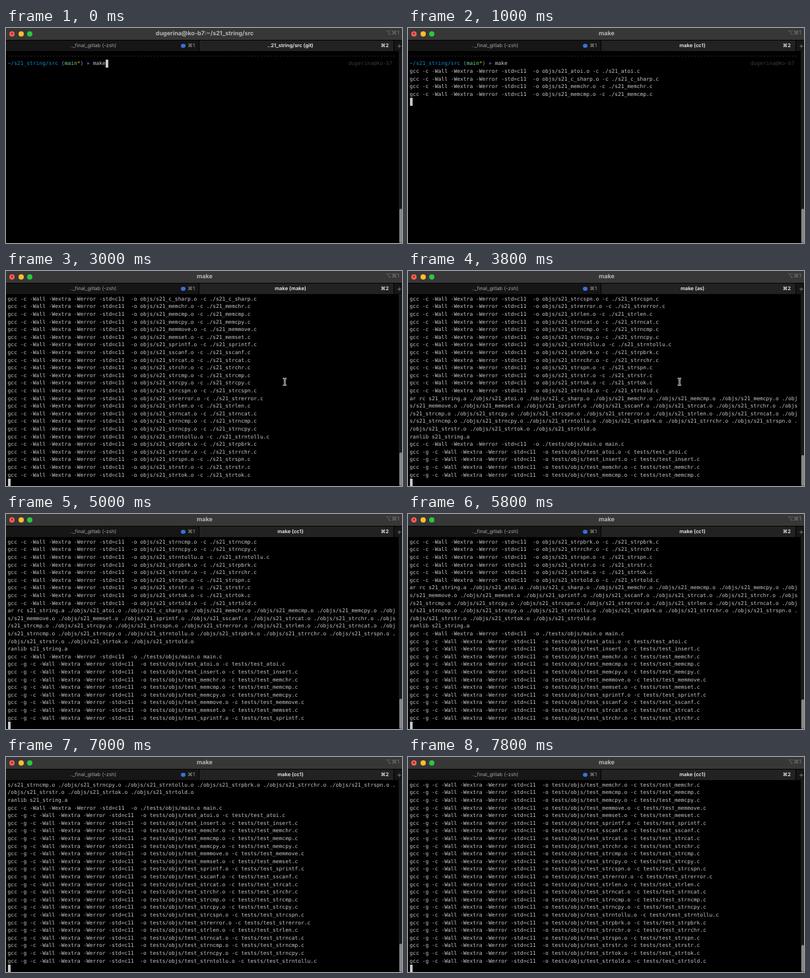
Write an HTML page that moves like this. It is 600 by 326 pixels and loops after 8 s.

```html
<!DOCTYPE html>
<html lang="en">
<head>
<meta charset="utf-8">
<title>Terminal build</title>
<style>
html, body { margin: 0; width: 100%; height: 100%; overflow: hidden; background: #000; }
#stage { position: relative; width: 600px; height: 326px; overflow: hidden; background: #000;
  font-family: Inter, sans-serif; text-rendering: geometricPrecision; }
#stage > * { position: absolute; white-space: pre; }
#bar { left: 0; top: 0; width: 600px; height: 18px; background: #373737; }
#title { left: 1px; width: 600px; top: 0; line-height: 17px; text-align: center;
  font-size: 9px; font-weight: 700; color: #b6b6b6; }
.tab { top: 19px; height: 16px; line-height: 16px; text-align: center; font-size: 7.65px; }
#tab1 { left: 0; width: 264px; padding-right: 28px; background: #161616; color: #a2a2a2; }
#tab2 { left: 293px; width: 276px; padding-right: 18px; background: #222; color: #f0f0f0; font-weight: 600; }
#plus { left: 588px; width: 12px; padding-left: 2px; background: #161616; color: #777; font-size: 12px; }
.key { font: 7.6px/16px Inter, "DejaVu Sans", sans-serif; }
.dot { border-radius: 50%; }
#text { margin: 0; left: 2.6px; top: 36.9px; color: #c7c7c7;
  font: 7.94px/11.59px "DejaVu Sans Mono", monospace; font-variant-ligatures: none; }
#cursor { width: 4.8px; height: 11.6px; background: #c7c7c7; }
#track { left: 594.5px; top: 35px; width: 5.5px; height: 291px; background: #1a1a1a; }
#thumb { left: 596px; bottom: 0; width: 4px; background: #858585; border-radius: 2px; }
#mouse { left: 0; top: 0; }
</style>
</head>
<body>
<div id="stage">
  <div id="bar"></div>
  <div id="title"></div>
  <div class="key" style="right:4px;top:0;color:#787878;font-size:8.5px">⌥⌘1</div>
  <div class="tab" id="tab1">.._final_gitlab (-zsh)</div>
  <div class="tab" id="tab2"></div>
  <div class="tab" id="plus">+</div>
  <div class="key" style="right:314px;top:19px;color:#a2a2a2">⌘1</div>
  <div class="key" style="right:20px;top:19px;color:#f0f0f0;font-weight:600">⌘2</div>
  <pre id="text"></pre>
  <div id="cursor"></div>
  <div id="track"></div>
  <div id="thumb"></div>
  <svg id="mouse" width="12" height="14" viewBox="-6 -7 12 14" fill="none">
    <path id="beam" d="M-2.6-5.2Q0-5.2 0-3.6Q0-5.2 2.6-5.2M0-4V4M-2.6 5.2Q0 5.2 0 3.6Q0 5.2 2.6 5.2M-1.5 1H1.5"
      stroke="#c8c8c8" stroke-width="2.2"/>
    <use href="#beam" style="stroke:#222"/>
    <path d="M-2.6-5.2Q0-5.2 0-3.6Q0-5.2 2.6-5.2M0-4V4M-2.6 5.2Q0 5.2 0 3.6Q0 5.2 2.6 5.2M-1.5 1H1.5"
      stroke="#222" stroke-width=".7"/>
  </svg>
</div>
<script>
const $ = id => document.getElementById(id);
const COLS = 123, ROWS = 25, ROW_H = 11.59, COL_W = 4.78, TOP = 36.4, LEFT = 2.5;
const USER = "dugerina@ko-b7", CWD = "~/s21_string/src";

function dot(x, y, r, color) {
  const d = document.createElement("div");
  d.className = "dot";
  d.style.cssText = `left:${x - r}px;top:${y - r}px;width:${2 * r}px;height:${2 * r}px;background:${color}`;
  $("stage").append(d);
}
dot(9, 8.6, 4, "#ff5f57");
dot(9, 8.6, 1.3, "#8a1a12");
dot(22.5, 8.6, 4, "#febc2e");
dot(36, 8.6, 4, "#28c840");
dot(268.5, 27, 3.3, "#3b6fe0");

// Terminal contents
const ink = (color, s) => `<span style="color:${color}">${s}</span>`;
const mem = "memchr memcmp memcpy memmove memset sprintf sscanf strcat strchr strcmp strcpy strcspn " +
  "strerror strlen strncat strncmp strncpy strntollu strpbrk strrchr strspn strstr strtok strtold";
const lib = ("atoi c_sharp " + mem).split(" ");
const tests = ("atoi insert " + mem).split(" ");
const flags = "-c -Wall -Wextra -Werror -std=c11  -o";
const archive = "ar rc s21_string.a " + lib.map(f => `./objs/s21_${f}.o`).join(" ");
const promptCols = CWD.length + 15;

const lines = [
  ink("#484848", "-".repeat(COLS)),
  ink("#1587d0", CWD) + " " + ink("#5fafff", "(") + ink("#6fd787", "main") + ink("#ffaf00", "*") +
    ink("#5fafff", ")") + " " + ink("#9494f0", "»") + " make" +
    " ".repeat(COLS - 1 - USER.length - promptCols) + ink("#3a3a3a", USER),
  ...lib.map(f => `gcc ${flags} objs/s21_${f}.o -c ./s21_${f}.c`),
  ...archive.match(new RegExp(`.{1,${COLS}}`, "g")),
  "ranlib s21_string.a",
  `gcc ${flags} ./tests/objs/main.o main.c`,
  ...tests.map(f => `gcc -g ${flags} tests/objs/test_${f}.o -c tests/test_${f}.c`)
];

// Cursor line at every 200 ms step
const STEP = 200, LOOP = 8000;
const cursorLine = [
  1, 3, 3, 3, 4, 6, 8, 10, 12, 14, 16, 18, 20, 22, 25, 27, 28, 34, 37, 39,
  40, 41, 41, 42, 42, 43, 44, 44, 44, 46, 47, 49, 50, 52, 53, 55, 56, 58, 59, 61
];

function job(t) {
  if (t < 800 || t === 3000) return "make";
  return t === 3800 ? "as" : "cc1";
}

function render(step) {
  const t = step * STEP, n = cursorLine[step], typing = step === 0;
  const scroll = Math.max(0, n - ROWS + 1);
  $("title").textContent = typing ? `${USER}:${CWD}` : "make";
  $("tab2").textContent = typing ? "..21_string/src (git)" : `make (${job(t)})`;
  $("text").innerHTML = lines.slice(scroll, typing ? 2 : n).join("\n");
  $("cursor").style.left = LEFT + (typing ? promptCols * COL_W : 0) + "px";
  $("cursor").style.top = TOP + (n - scroll) * ROW_H + "px";
  $("thumb").style.height = 291 * ROWS / (140 + scroll) + "px";
  const x = 422.4 - 11 * Math.min(1, Math.max(0, (t - 3000) / 800));
  $("mouse").style.transform = `translate(${x - 6}px, 161px)`;
  $("mouse").style.display = t >= 2800 && t < 4600 ? "block" : "none";
}

const start = performance.now();
let shown = -1;
function tick() {
  const step = Math.floor((performance.now() - start) % LOOP / STEP);
  if (step !== shown) render(shown = step);
  requestAnimationFrame(tick);
}
tick();
</script>
</body>
</html>
```
